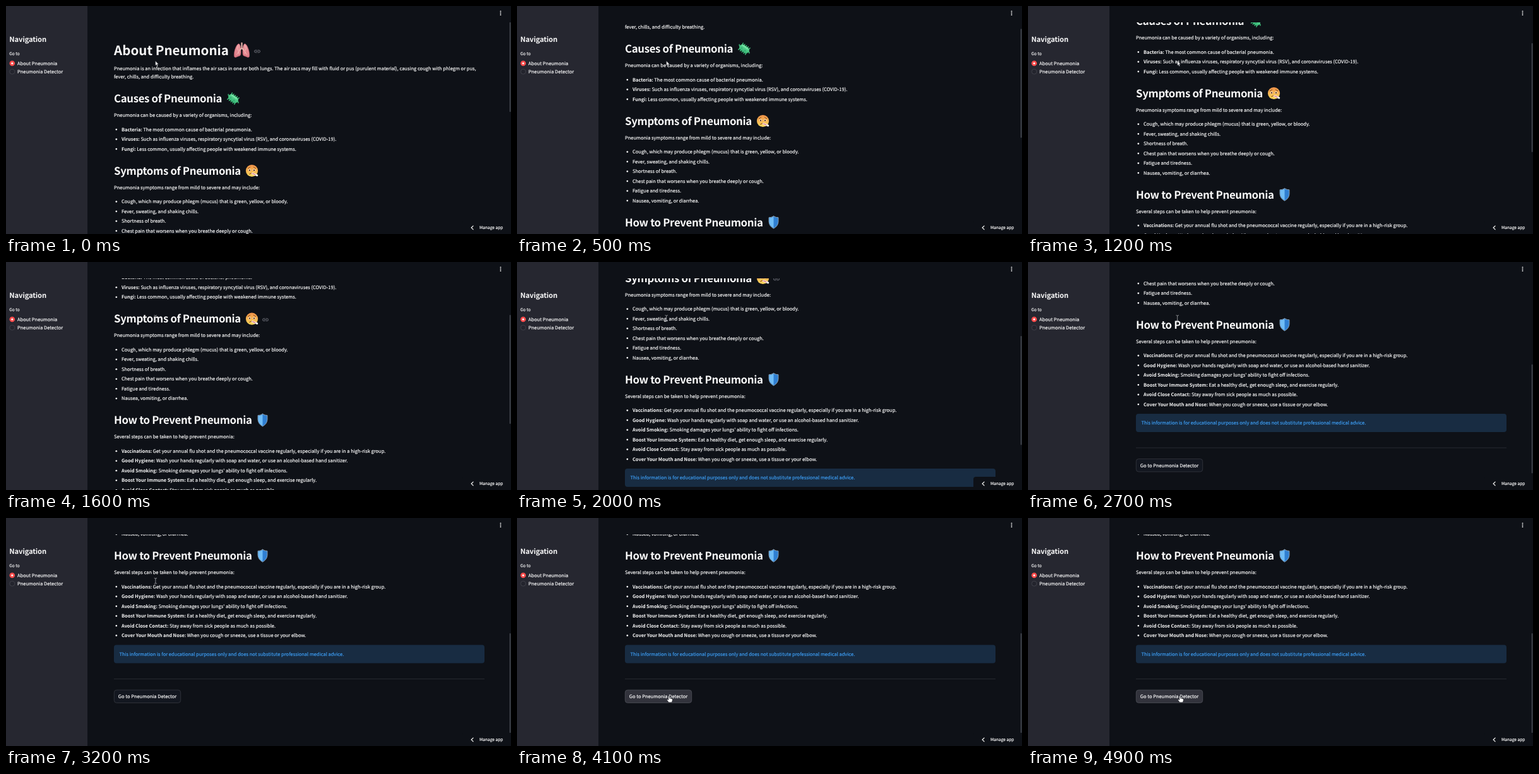
Write an HTML page with a canvas that moves like this. It is 800 px wide and 362 px high and loops after 5000 ms.

```html
<!DOCTYPE html>
<html lang="en">
<head>
<meta charset="utf-8">
<title>About Pneumonia</title>
<style>
  html, body { margin: 0; width: 100%; height: 100%; overflow: hidden; background: #0e1117; }
  canvas { display: block; width: 800px; height: 362px; }
</style>
</head>
<body>
<canvas id="stage" width="800" height="362"></canvas>
<script>
const ctx = document.getElementById('stage').getContext('2d');
const LOOP = 5000, STEP = 100;
const BG = '#0e1117', SIDE = '#262730', INK = '#fafafa';
const FAMILY = '"Noto Sans CJK JP", "Noto Sans CJK SC", "Noto Sans CJK", "Open Sans", sans-serif';
const ZOOM = 0.469;

// time, scroll offset
const SCROLL = [[0, 0], [100, 3], [500, 79], [800, 110], [1200, 123], [1400, 134],
  [1700, 190], [2000, 236], [2300, 260], [2500, 285], [2700, 323], [3000, 362.5]];

const SECTIONS = [
  { y: 147, title: 'Causes of Pneumonia', icon: microbe, iconX: 360,
    intro: 'Pneumonia can be caused by a variety of organisms, including:',
    items: ['Bacteria:| The most common cause of bacterial pneumonia.',
      'Viruses:| Such as influenza viruses, respiratory syncytial virus (RSV), and coronaviruses (COVID-19).',
      'Fungi:| Less common, usually affecting people with weakened immune systems.'] },
  { y: 261.5, title: 'Symptoms of Pneumonia', icon: sickFace, iconX: 389.5,
    intro: 'Pneumonia symptoms range from mild to severe and may include:',
    items: ['Cough, which may produce phlegm (mucus) that is green, yellow, or bloody.',
      'Fever, sweating, and shaking chills.', 'Shortness of breath.',
      'Chest pain that worsens when you breathe deeply or cough.',
      'Fatigue and tiredness.', 'Nausea, vomiting, or diarrhea.'] },
  { y: 422.5, title: 'How to Prevent Pneumonia', icon: shield, iconX: 406.5,
    intro: 'Several steps can be taken to help prevent pneumonia:',
    items: ['Vaccinations:| Get your annual flu shot and the pneumococcal vaccine regularly, especially if you are in a high-risk group.',
      'Good Hygiene:| Wash your hands regularly with soap and water, or use an alcohol-based hand sanitizer.',
      'Avoid Smoking:| Smoking damages your lungs\' ability to fight off infections.',
      'Boost Your Immune System:| Eat a healthy diet, get enough sleep, and exercise regularly.',
      'Avoid Close Contact:| Stay away from sick people as much as possible.',
      'Cover Your Mouth and Nose:| When you cough or sneeze, use a tissue or your elbow.'] }
];

// Text is laid out at ten times its size for exact advances; y is the middle of the capitals.
function text(str, x, y, { size = 16, weight = 400, color = INK, track = 0 } = {}) {
  const px = size * ZOOM * 10;
  ctx.save();
  ctx.translate(x, y + size * 0.175);
  ctx.scale(0.1, 0.1);
  ctx.font = `${weight} ${px}px ${FAMILY}`;
  ctx.textRendering = 'geometricPrecision';
  ctx.letterSpacing = px * track + 'px';
  ctx.fillStyle = ctx.strokeStyle = color;
  ctx.fillText(str, 0, 0);
  if (weight === 400) {
    // A hairline keeps small regular text bright.
    ctx.lineWidth = 1.8;
    ctx.lineJoin = 'round';
    ctx.strokeText(str, 0, 0);
  }
  const width = ctx.measureText(str).width / 10;
  ctx.restore();
  return width;
}

function shape(path, fill, stroke, width = 1) {
  const p = typeof path === 'string' ? new Path2D(path) : path;
  if (fill) { ctx.fillStyle = fill; ctx.fill(p); }
  if (stroke) { ctx.strokeStyle = stroke; ctx.lineWidth = width; ctx.stroke(p); }
}

function disc(x, y, r, fill, stroke, width) {
  const p = new Path2D();
  p.arc(x, y, r, 0, 7);
  shape(p, fill, stroke, width);
}

function box(x, y, w, h, r, fill, stroke, width) {
  const p = new Path2D();
  p.roundRect(x, y, w, h, r);
  shape(p, fill, stroke, width);
}

function at(x, y, scale, draw) {
  ctx.save();
  ctx.translate(x, y);
  ctx.scale(scale, scale);
  ctx.lineCap = ctx.lineJoin = 'round';
  draw();
  ctx.restore();
}

function fade(y0, y1, a, b) {
  const g = ctx.createLinearGradient(0, y0, 0, y1);
  g.addColorStop(0, a);
  g.addColorStop(1, b);
  return g;
}

// Icons fit a box from -10 to 10.
function lungs() {
  const lobe = 'M1.2-1C1.2-4 2.4-8 4-8C6.6-7.4 9.6 0 9.8 6C9.9 9.4 8.6 9.8 6.6 8.8C4.4 7.6 2.2 8 1.5 6C1 4 1.2 2 1.2-1Z';
  const veins = 'M1.5-1L4 2L6.6 6M4 2L3.8 5M4 1L5.6-2L4.8-5';
  for (const side of [1, -1]) {
    ctx.save();
    ctx.scale(side, 1);
    shape(lobe, fade(-9, 9, '#f0a0a4', '#dc7884'), '#b9596b', 0.5);
    shape(veins, null, '#f5bcba', 0.7);
    ctx.restore();
  }
  shape('M0-9L0-2.6M0-2.6L-2.2-.6M0-2.6L2.2-.6', null, '#e6b4aa', 1.8);
}

function microbe() {
  ctx.save();
  ctx.rotate(0.62);
  for (let i = -2; i <= 2; i++) {
    shape(`M${i * 3.2}-4L${i * 3.4}-6.4M${i * 3.2} 4L${i * 3.4} 6.4`, null, '#3fc07c', 1.6);
  }
  shape('M8 0Q10-1 10.6 1M-8 0Q-9.6 1-10.4-1', null, '#3fc07c', 1.5);
  box(-8.8, -5, 17.6, 10, 5, fade(-5, 5, '#62dd98', '#35b474'));
  disc(-4, 1, 1, '#2fa56c');
  disc(2.6, 1.4, 1.1, '#2fa56c');
  shape('M-5.4-3L4.6-3', null, '#90eeb4', 1);
  ctx.restore();
}

function sickFace() {
  disc(0, 0, 9.8, fade(-10, 8, '#ee8f48', '#fdd35a'));
  for (const x of [-3.6, 3.6]) {
    disc(x, -1, 2, '#fff3da');
    disc(x, -0.8, 1.2, '#5b2d16');
  }
  shape('M-6.3-3.8Q-4.2-4.4-2.8-5.8M6.3-3.8Q4.2-4.4 2.8-5.8M-4 5.4Q-1 3 2 4.4', null, '#7a4019', 1);
  shape('M1 4.5L8.4 7.6', null, '#f4f6f8', 3);
  shape('M1 4.5L5.6 6.4', null, '#df3a3f', 1);
}

function shield() {
  const outline = 'M0-10Q4-7.6 7.6-7.8L7.6-1Q7.2 6 0 10Q-7.2 6-7.6-1L-7.6-7.8Q-4-7.6 0-10Z';
  shape(outline, '#2f7fd2', '#8ba2b6', 1);
  shape('M0-9.2Q-4-7-7-7.1L-7-1Q-6.7 5.4 0 9.2Z', '#70bdf6');
}

function link(x, y) {
  at(x, y, 1, () => shape('M-1-1.9L-2.6-1.9A1.9 1.9 0 0 0-2.6 1.9L-1 1.9M1-1.9L2.6-1.9A1.9 1.9 0 0 1 2.6 1.9L1 1.9M-2 0L2 0',
    null, '#74777f', 0.9));
}

const POINTERS = {
  arrow: () => shape('M0 0L0 7L1.5 5.6L2.7 8.2L3.9 7.6L2.8 5.1L4.9 4.9Z', '#f4f4f4', '#30323a', 0.5),
  beam: () => shape('M-1.8-4.4Q0-4.4 0-3.2Q0-4.4 1.8-4.4M0-3.4L0 3.4M-1.8 4.4Q0 4.4 0 3.2Q0 4.4 1.8 4.4', null, '#a6a8ad', 0.8),
  hand: () => shape('M-1 .8Q0-.6 1 .8L1 4Q2 3 2.7 4.2Q3.8 3.5 4.3 4.6Q5.6 4.2 5.7 5.6L5.3 8.2L4.3 10.3L-.3 10.3L-3 6.8Q-3.6 5.2-2.2 5.4L-1 6.3Z',
    '#fff', '#181a20', 0.6)
};

function scrollAt(t) {
  const last = SCROLL.length - 1;
  if (t >= SCROLL[last][0]) return SCROLL[last][1];
  const i = SCROLL.findIndex(p => p[0] > t) - 1;
  const [t0, s0] = SCROLL[i], [t1, s1] = SCROLL[i + 1];
  return s0 + (s1 - s0) * (t - t0) / (t1 - t0);
}

function pointerAt(t) {
  const k = Math.min(1, Math.max(0, (t - 3100) / 700));
  const e = k * k * (3 - 2 * k);
  const kind = t < 1400 ? 'arrow' : e < 0.9 ? 'beam' : 'hand';
  return { kind, x: 236.7 + 4 * e, y: (kind === 'beam' ? 89 : 87.5) + 195 * e };
}

function listItem(str, y) {
  disc(174.8, y + 0.4, 1.35, INK);
  const [strong, rest] = str.includes('|') ? str.split('|') : ['', str];
  const w = strong ? text(strong, 183, y, { weight: 600, track: -0.008 }) : 0;
  text(rest, 183 + w, y);
}

function page(t, hover) {
  text('About Pneumonia', 171, 70, { size: 44, weight: 700, track: -0.002 });
  at(373.5, 70, 1.24, lungs);
  if (t < 300) link(398, 72);
  text('Pneumonia is an infection that inflames the air sacs in one or both lungs. The air sacs may fill with fluid or pus (purulent material), causing cough with phlegm or pus,', 171, 99);
  text('fever, chills, and difficulty breathing.', 171, 112.5);

  for (const { y, title, icon, iconX, intro, items } of SECTIONS) {
    text(title, 171, y, { size: 36, weight: 600, track: -0.022 });
    at(iconX, y, 0.98, icon);
    text(intro, 171, y + 26.5);
    items.forEach((item, i) => listItem(item, y + 48.7 + i * 15.5));
  }
  if (t >= 1500 && t < 2300) link(411, 263);

  box(171, 564, 587, 29, 4, '#182c42');
  text('This information is for educational purposes only and does not substitute professional medical advice.', 179.5, 578.5, { color: '#3d9df3' });
  ctx.fillStyle = '#2d3037';
  ctx.fillRect(171, 617.6, 587, 0.8);
  box(171.3, 635.6, 105.4, 20.4, 4, hover ? '#32333c' : '#131720', hover ? '#54565e' : '#3b3e45', 0.7);
  text('Go to Pneumonia Detector', 177.8, 645.8);
}

function sidebar() {
  ctx.fillStyle = SIDE;
  ctx.fillRect(0, 0, 129, 362);
  text('Navigation', 5.3, 53.2, { size: 24, weight: 600, track: -0.014 });
  text('Go to', 5.3, 75.5, { size: 14 });
  disc(9.8, 91, 4.3, '#ff4b4b');
  disc(9.8, 91, 1.6, '#fff');
  disc(9.8, 104.2, 4, '#23242d', '#474850', 0.8);
  text('About Pneumonia', 18, 91);
  text('Pneumonia Detector', 18, 104.5);
}

function draw(t) {
  const scroll = scrollAt(t), pointer = pointerAt(t);
  ctx.fillStyle = BG;
  ctx.fillRect(0, 0, 800, 362);

  ctx.save();
  ctx.beginPath();
  ctx.rect(129, 26, 671, 336);
  ctx.clip();
  ctx.save();
  ctx.translate(0, -scroll);
  page(t, pointer.kind === 'hand');
  ctx.restore();
  box(797.8, -4.7 + scroll * 0.518, 1.6, 173, 0.8, '#484c54');
  ctx.restore();

  sidebar();
  for (const y of [8.4, 11.2, 14]) disc(783.5, y, 0.95, INK);
  box(723, 341, 80, 30, [4, 0, 0, 0], BG);
  at(738.6, 352, 1, () => shape('M1.5-2.9L-1.5 0L1.5 2.9', null, INK, 1.2));
  text('Manage app', 750, 352, { size: 14 });

  at(pointer.x, pointer.y, 1, POINTERS[pointer.kind]);
}

const start = performance.now();
function tick() {
  const t = (performance.now() - start) % LOOP;
  draw(Math.floor(t / STEP) * STEP);
  requestAnimationFrame(tick);
}
tick();
</script>
</body>
</html>
```
